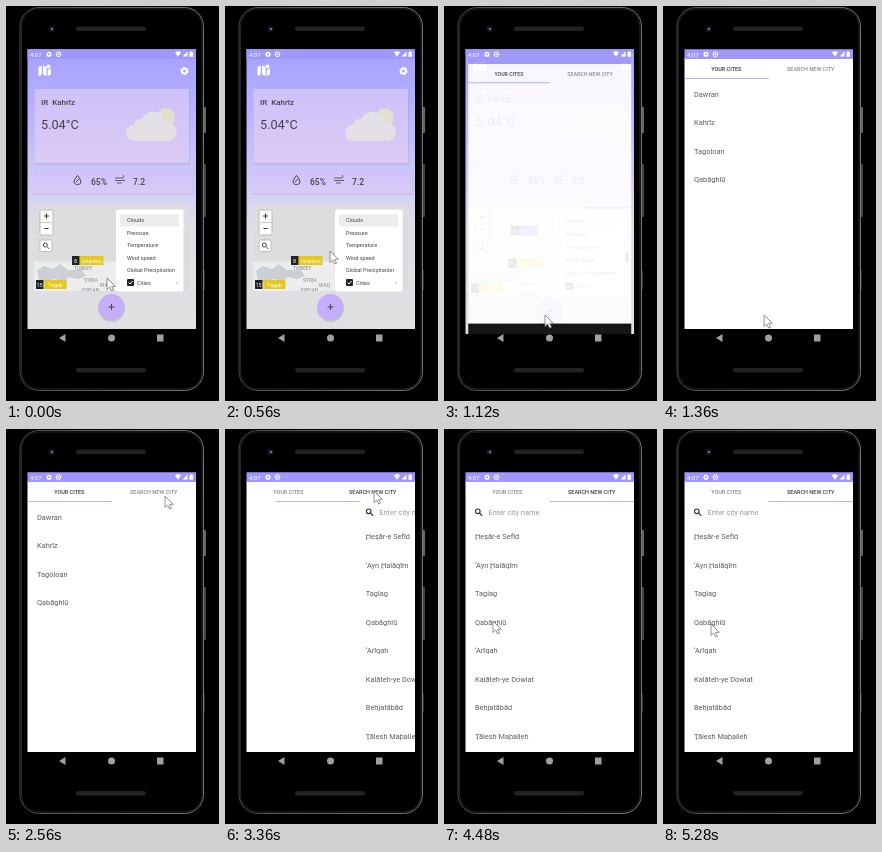
An HTML page that plays this animation: 213 by 395 pixels, repeating every 5360 ms.

```html
<!DOCTYPE html>
<html lang="en">
<head>
<meta charset="utf-8">
<style>
  html, body { margin: 0; height: 100%; overflow: hidden; background: #000; }
  svg { display: block; width: 213px; height: 395px; font-family: Roboto, "Noto Sans", sans-serif; }
  .mid { text-anchor: middle; }
</style>
</head>
<body>
<svg viewBox="0 0 213 395">
  <defs>
    <linearGradient id="sky" x2="0" y2="1">
      <stop stop-color="#a5a0ff"/><stop offset=".2" stop-color="#b5b1ff"/>
      <stop offset=".5" stop-color="#d0cef8"/><stop offset=".62" stop-color="#dedee6"/><stop offset="1" stop-color="#e0e0e2"/>
    </linearGradient>
    <linearGradient id="card" x2="0" y2="1"><stop stop-color="#cfc1fb"/><stop offset="1" stop-color="#dacbf5"/></linearGradient>
    <linearGradient id="rim"><stop stop-color="#4a4a4a"/><stop offset="1" stop-color="#777"/></linearGradient>
    <clipPath id="screen"><rect x="21.500" y="43.300" width="168.500" height="284.700"/></clipPath>
    <clipPath id="lists"><rect x="21" y="73" width="169.500" height="250"/></clipPath>
    <clipPath id="mapBox"><rect x="28" y="199" width="155" height="86"/></clipPath>
    <rect id="pin" width="7.500" height="9" fill="#222"/>
  </defs>

  <!-- phone -->
  <rect x="197" y="101" width="3" height="26" rx="1" fill="#666"/>
  <rect x="197" y="158" width="3" height="53" rx="1" fill="#444"/>
  <rect x="197" y="264" width="2" height="20" rx="1" fill="#2a2a2a"/>
  <rect x="14" y="1.500" width="183.500" height="383" rx="19" stroke="url(#rim)"/>
  <rect x="15.500" y="3" width="180.500" height="380" rx="17.500" fill="none" stroke="#262626"/>
  <rect x="70" y="20.500" width="70" height="4.500" rx="2.250" fill="#222"/>
  <rect x="70" y="362" width="70" height="4.500" rx="2.250" fill="#222"/>
  <circle cx="45.500" cy="23" r="3" fill="#161922"/><circle cx="46" cy="23" r="1" fill="#8592b0"/>
  <g fill="#a0a0a0">
    <path d="M53 332l6.500-4v8z"/><circle cx="105.500" cy="332" r="3.500"/><rect x="151" y="328.500" width="6.500" height="7"/>
  </g>

  <g clip-path="url(#screen)">
    <!-- weather screen -->
    <g id="home">
      <rect x="21" y="43" width="169.500" height="280" fill="url(#sky)"/>
      <rect x="21" y="43" width="169.500" height="10" fill="#9f98fa"/>
      <g fill="#fff">
        <path d="M32.500 61l3.300-1.500v9l-3.300 1.500zM37 59.500l3.500 1.500v9l-3.500-1.500zM41.700 64l3.300-1.500v6l-3.300 1.500z"/>
        <circle cx="42.500" cy="60.500" r="2"/>
      </g>
      <circle cx="178.500" cy="65" r="2.500" fill="none" stroke="#fff" stroke-width="2"/>
      <circle cx="178.500" cy="65" r="3.800" fill="none" stroke="#fff" stroke-dasharray="1.700 2.280"/>
      <g fill="#77779a" opacity=".15"><rect x="28" y="84" width="156" height="75"/><rect x="28" y="164" width="160" height="25"/></g>
      <rect x="28.500" y="83" width="154.500" height="74" fill="url(#card)"/>
      <rect x="28" y="163.500" width="159" height="24" fill="url(#card)"/>
      <g fill="#444">
        <text x="35" y="99" font-size="8" font-weight="500" xml:space="preserve">IR  Kahrīz</text>
        <text x="35" y="122.500" font-size="12.700">5.04°C</text>
        <g font-size="8.500" font-weight="500"><text x="85" y="178.500">65%</text><text x="127" y="178.500">7.2</text></g>
      </g>
      <circle cx="160" cy="111" r="9" fill="#e3dfcf"/>
      <path d="M128 135a8 8 0 0 1 0-16 7 7 0 0 1 8-6 12 12 0 0 1 23 4 9 9 0 0 1 5 18z" fill="#e3e1e6"/>
      <g fill="none" stroke="#444">
        <path d="M71.500 169.500c-5 6-4 9 0 9s5-3 0-9M70 176l3-3"/>
        <path d="M109 172h8q2-2 0-3M109 174.500h10M111 177h5" stroke-width=".8"/>
      </g>

      <g clip-path="url(#mapBox)">
        <rect x="28" y="199" width="155" height="86" fill="#dddddf"/>
        <rect id="tiles" x="28" y="199" width="82" height="57" fill="#e4e7e6"/>
        <rect x="28" y="255.500" width="82" height="30" fill="#eceeee"/>
        <path d="M31 265l7-5 9 3 7-5 8 6h14l4 6-8 3-9-2-5 4-10-2-7 4-8-3z" fill="#cbd0d5"/>
        <g font-size="5" fill="#888"><text x="68" y="264">TURKEY</text><text x="78" y="276">SYRIA</text><text x="94" y="281">IRAQ</text><text x="74" y="286">JORDAN</text></g>
        <g font-size="5.500" fill="#fff">
          <rect x="73.500" y="250" width="24" height="9" fill="#e5c71d"/><use href="#pin" x="66" y="250"/>
          <text x="68" y="256.500">8</text><text x="76" y="256.500">İstanbul</text>
          <rect x="38.500" y="274" width="22" height="9" fill="#e5c71d"/><use href="#pin" x="30" y="274"/>
          <text x="30.500" y="280.500">15</text><text x="42" y="280.500">Taguk</text>
          <g id="extra">
            <rect x="76" y="218.500" width="18" height="9" fill="#4a70e8"/><use href="#pin" x="68.500" y="218.500"/>
            <text x="70.500" y="225">4</text><text x="79" y="225">Kyiv</text>
            <rect x="140" y="200" width="42" height="2" fill="#4a70e8"/>
            <rect x="178.500" y="244" width="3" height="9" fill="#333"/>
          </g>
        </g>
      </g>
      <rect x="34" y="204" width="13" height="25" rx="1.500" fill="#fff" stroke="#bbb"/>
      <path d="M34 216.500h13" stroke="#ccc"/>
      <path d="M38 210h5M40.500 207.500v5M38.500 222.500h4" stroke="#333"/>
      <rect x="34" y="234" width="12" height="11.500" rx="1.500" fill="#fff" stroke="#bbb"/>
      <g fill="none" stroke="#444"><circle cx="39.300" cy="239" r="2"/><path d="M41 240.700l2.300 2.300"/></g>
      <rect x="110" y="203.500" width="67.500" height="82" rx="2" fill="#fff"/>
      <rect x="114" y="208" width="59" height="12.500" rx="1" fill="#ededed"/>
      <g id="layers" font-size="5.500" fill="#444"></g>
      <rect x="121" y="273" width="7" height="7" rx="1" fill="#222"/>
      <path d="M122.500 276.500l1.500 1.500 2.700-3" fill="none" stroke="#fff"/>
      <path d="M170 277h2" stroke="#999" stroke-width=".7"/>
      <circle cx="105.500" cy="302.500" r="13.500" fill="#888" opacity=".3"/>
      <circle cx="105.500" cy="301" r="13" fill="#c5adfb"/>
      <path d="M102.500 301h6M105.500 298v6" stroke="#444"/>
    </g>

    <!-- city screen, with the strip its window has behind the navigation bar -->
    <g id="cities">
      <rect x="21" y="52" width="169.500" height="271" fill="#fff"/>
      <rect x="21" y="43" width="169.500" height="10" fill="#9f98fa"/>
      <rect id="strip" x="21" y="323" width="169.500" height="19"/>
      <g class="mid" font-size="5.500" font-weight="500">
        <text id="tabA" x="63.300" y="65.300">YOUR CITES</text><text id="tabB" x="147.700" y="65.300">SEARCH NEW CITY</text>
      </g>
      <rect id="bar" x="21" y="72" width="84.700" height="1" fill="#c2aefa"/>
      <g clip-path="url(#lists)">
        <g id="pages" font-size="7.400" fill="#5c5c5c">
          <g id="saved"></g>
          <g id="found" transform="translate(169.500)">
            <g fill="none" stroke="#333" stroke-width="1.100"><circle cx="33.800" cy="82.300" r="2.300"/><path d="M35.500 84l2.800 2.800"/></g>
            <text x="44.500" y="86.300" fill="#999">Enter city name</text>
          </g>
        </g>
      </g>
    </g>

    <!-- status icons -->
    <g fill="#fff">
      <text x="24" y="50.500" font-size="6">4:07</text>
      <circle cx="43" cy="48.200" r="1.800" fill="none" stroke="#fff" stroke-width="1.500"/>
      <circle cx="52.500" cy="48.200" r="2.400" fill="none" stroke="#fff"/><circle cx="52.500" cy="48.200" r="1"/>
      <path d="M169 46.500q3-2.300 6 0l-3 4.200zM181.500 45.500v5h-5zM183.500 46h1v-.8h1.500v.8h1v4.800h-3.500z"/>
    </g>
  </g>

  <path id="cursor" d="M0 0V11.500L2.700 9 4.600 13 6.500 12.200 4.700 8.300H8.300Z" fill="#fff" stroke="#777" stroke-width=".8"/>
</svg>
<script>
const $ = id => document.getElementById(id);
const LOOP = 5360, STEP = 80, WIDTH = 169.5;
const clamp = v => Math.min(1, Math.max(0, v));
const span = (t, from, to) => clamp((t - from) / (to - from));
const smooth = p => p * p * (3 - 2 * p);

function addRows(id, rows, x, y, gap) {
  rows.forEach((row, i) => {
    const text = document.createElementNS("http://www.w3.org/2000/svg", "text");
    text.setAttribute("x", x(i));
    text.setAttribute("y", y + i * gap);
    text.textContent = row;
    $(id).append(text);
  });
}
addRows("layers", ["Clouds", "Pressure", "Temperature", "Wind speed", "Global Precipitation", "Cities"],
  i => i < 5 ? 121 : 131, 216, 12.5);
addRows("saved", ["Dawran", "Kahrīz", "Tagoloan", "Qabāghlū"], () => 31, 90.8, 28.5);
addRows("found", ["Ḩeşār-e Sefīd", "‘Ayn Ḩalāqīm", "Taglag", "Qabāghlū", "‘Arīqah",
  "Kalāteh-ye Dowlat", "Behjatābād", "Ţālesh Maḩalleh"], () => 31, 110.3, 28.5);

// pointer stops: time, x, y
const stops = [[0, 101, 272], [560, 105, 245], [960, 101, 309], [1920, 101, 309], [2480, 159, 67],
  [2560, 159, 67], [2960, 149, 62], [3920, 149, 62], [4480, 49, 192], [4640, 48, 195], [LOOP, 48, 195]];

function pointer(t) {
  const i = stops.findIndex(s => s[0] > t);
  const [a, x, y] = stops[i - 1], [b, u, v] = stops[i];
  const e = smooth(span(t, a, b));
  return [x + (u - x) * e, y + (v - y) * e];
}

const zoom = s => `translate(105.75 183) scale(${s}) translate(-105.75 -183)`;
const show = (id, on) => $(id).setAttribute("visibility", on ? "inherit" : "hidden");

function draw(t) {
  const p = span(t, 1040, 1280), open = 1 - (1 - p) ** 3;
  show("home", p < 1);
  show("tiles", t >= 720);
  show("extra", t >= 720);
  show("cities", p > 0);
  show("strip", p < 1 && p > 0);
  show("saved", t >= 1200);
  $("home").setAttribute("transform", zoom(1 + .055 * open));
  $("cities").setAttribute("transform", zoom(.87 + .13 * open));
  $("cities").setAttribute("opacity", clamp(p * 2.7));

  const slide = smooth(span(t, 3200, 3600)), later = t >= 3280;
  $("pages").setAttribute("transform", `translate(${-WIDTH * slide})`);
  $("bar").setAttribute("transform", `translate(${WIDTH / 2 * slide})`);
  $("tabA").setAttribute("fill", later ? "#888" : "#3c3c3c");
  $("tabB").setAttribute("fill", later ? "#3c3c3c" : "#888");
  $("cursor").setAttribute("transform", `translate(${pointer(t)})`);
}

const start = performance.now();
function tick() {
  const t = (performance.now() - start) % LOOP;
  draw(Math.floor(t / STEP) * STEP);
  requestAnimationFrame(tick);
}
tick();
</script>
</body>
</html>
```
